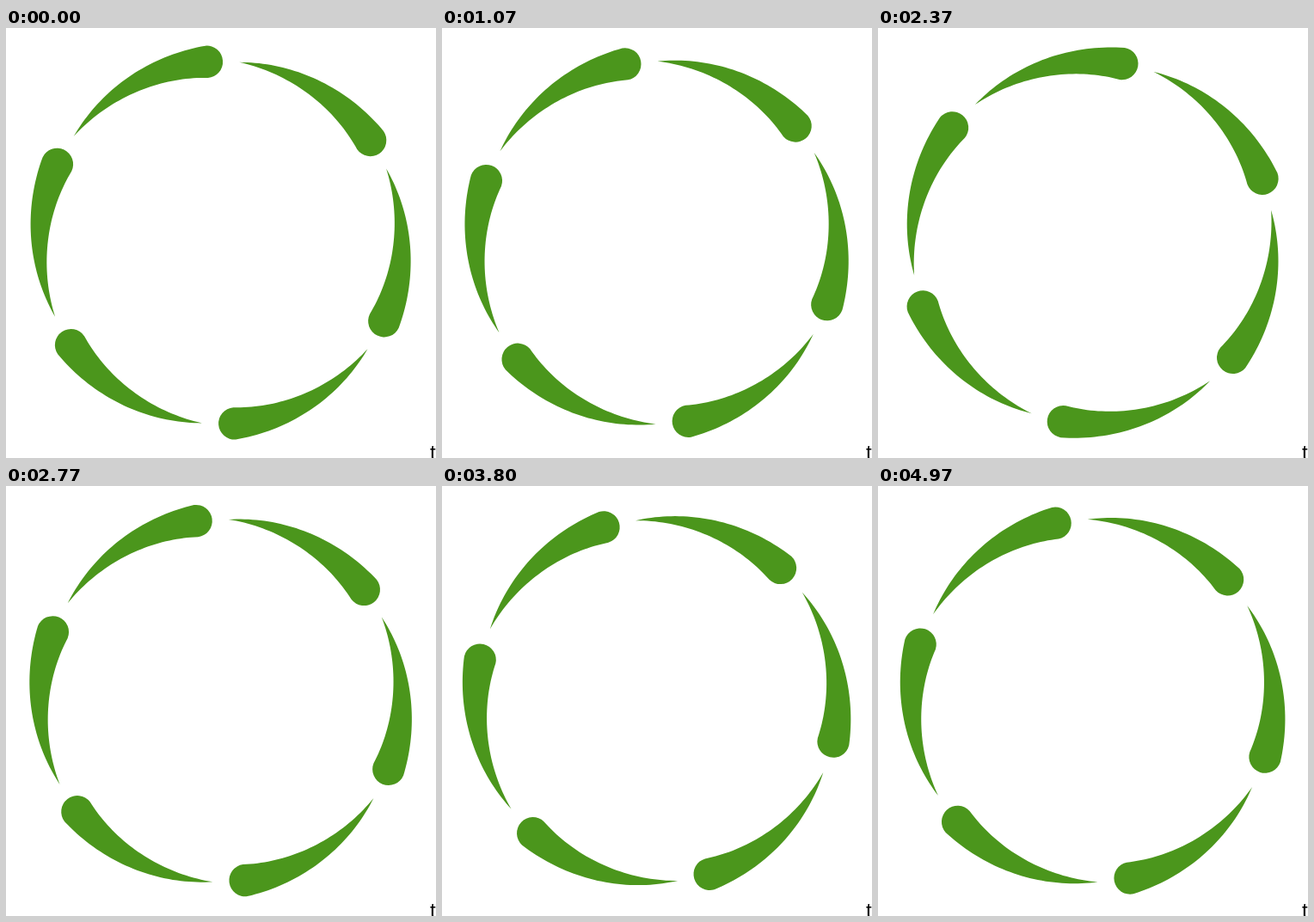
Write an HTML page that moves like this. It is 500 px wide and 500 px high and loops after 5010 ms.

```html
<!DOCTYPE html>
<html lang="en">
<head>
<meta charset="utf-8">
<title>Rotating ring</title>
<style>
  html, body { margin: 0; width: 100%; height: 100%; overflow: hidden; background: #fff; }
  svg { display: block; width: 100vw; height: 100vh; }
  text { font: 24px "Liberation Sans", sans-serif; }
</style>
</head>
<body>
<svg viewBox="0 0 500 500">
  <defs><path id="comet" fill="#4b961c"/></defs>
  <g id="ring"></g>
  <text x="493" y="502">t</text>
</svg>
<script>
  const LOOP = 5010, LAST_STEP = 149;
  const STEP_ANGLE = 3.5738, START_ANGLE = -4.4;
  const CENTER = 249.6, RADIUS = 210.9, HEAD = 18.7, SPAN = 49.7, BULGE = 0.8, COUNT = 6;

  const comet = document.getElementById('comet');
  const ring = document.getElementById('ring');

  // Angle in degrees, clockwise from the top
  function polar(angle, radius) {
    const a = angle * Math.PI / 180;
    return (radius * Math.sin(a)).toFixed(2) + ' ' + (-radius * Math.cos(a)).toFixed(2);
  }

  // A band that widens from the tip to a round head, slightly fuller on the inside
  function cometPath(parts = 40) {
    const outer = [], inner = [];
    for (let i = 0; i <= parts; i++) {
      const s = i / parts, angle = SPAN * (s - 1);
      outer.push(polar(angle, RADIUS + HEAD * s));
      inner.unshift(polar(angle, RADIUS - HEAD * s - BULGE * Math.sin(Math.PI * s)));
    }
    return `M${outer.join('L')}A${HEAD} ${HEAD} 0 0 1 ${inner.join('L')}Z`;
  }

  comet.setAttribute('d', cometPath());
  for (let i = 0; i < COUNT; i++) {
    const use = document.createElementNS('http://www.w3.org/2000/svg', 'use');
    use.setAttribute('href', '#comet');
    use.setAttribute('transform', `rotate(${i * 360 / COUNT})`);
    ring.append(use);
  }

  // 30 steps a second, each starting on a multiple of 10 ms
  function stepAt(ms) {
    return Math.min(LAST_STEP, Math.floor((Math.floor(ms / 10) + 0.5) * 0.3));
  }

  const start = performance.now();
  function draw() {
    const ms = (performance.now() - start) % LOOP;
    const angle = START_ANGLE + stepAt(ms) * STEP_ANGLE;
    ring.setAttribute('transform', `translate(${CENTER} ${CENTER}) rotate(${angle.toFixed(3)})`);
    requestAnimationFrame(draw);
  }
  draw();
</script>
</body>
</html>
```
